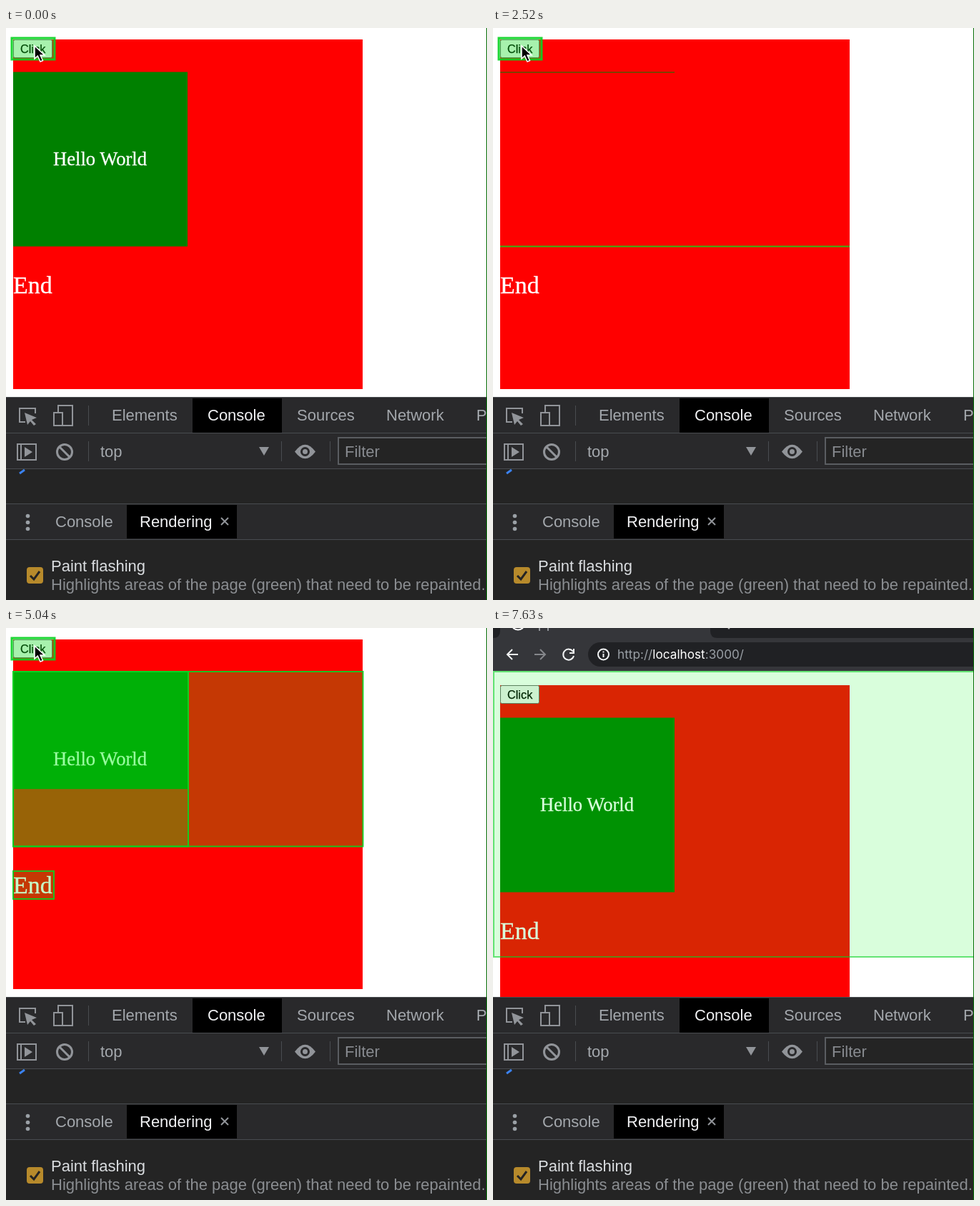
Write an HTML page that moves like this. It is 673 px wide and 800 px high and loops after 7.7 s.

```html
<!DOCTYPE html>
<html lang="en">
<head>
<meta charset="utf-8">
<title>Paint flashing</title>
<style>
  html, body { margin: 0; width: 100%; height: 100%; overflow: hidden; background: #fff; }
  svg { display: block; width: 673px; height: 800px; }
  text { white-space: pre; }
  .ui { font: 22px "Liberation Sans", Arial, sans-serif; fill: #a4a8ad; }
  .serif { font-family: "Liberation Serif", Times, serif; fill: #fff; stroke: #fff; stroke-width: .3; }
  .bright { fill: #f1f2f4; }
  .line { fill: none; stroke: #919499; stroke-width: 2; }
  .flash { fill: rgb(0,245,20); stroke: rgb(10,210,35); stroke-width: 2; }
</style>
</head>
<body>
<svg viewBox="0 0 673 800">
  <defs>
    <clipPath id="reveal"><rect id="revealRect" x="10" y="61.5" width="244" height="244"/></clipPath>
  </defs>
  <rect width="673" height="800" fill="#fff"/>

  <g id="page">
    <rect x="10" y="16" width="489" height="489" fill="#f00"/>
    <g clip-path="url(#reveal)">
      <rect x="10" y="61" width="244" height="245" fill="#008000"/>
      <text class="serif" x="66" y="192" font-size="26.6">Hello World</text>
    </g>
    <text id="end" class="serif" x="10" y="371" font-size="34">End</text>
    <rect id="edge" x="10" y="304.5" width="489" height="2" fill="#32b814"/>
    <rect x="10.5" y="16.5" width="54" height="25" rx="2" fill="#efefef" stroke="#6b6b6b"/>
    <text x="20" y="35" font-size="16.3" font-family="Liberation Sans, Arial, sans-serif" stroke="#000" stroke-width=".25">Click</text>
    <g id="flashes"></g>
  </g>

  <g id="toolbar">
    <rect width="673" height="60" fill="#35363a"/>
    <path d="M304 0V4Q304 14 314 14H673V0ZM0 0H10V4Q10 14 0 14Z" fill="#202124"/>
    <path d="M28 0Q35 5 42 0" fill="none" stroke="#fff" stroke-width="2"/>
    <path d="M65 0V4M77 0V4" class="line"/>
    <circle cx="330" r="1.5" fill="#bbb"/>
    <rect x="133" y="20" width="570" height="34" rx="17" fill="#202124"/>
    <g fill="none" stroke="#f1f3f4" stroke-width="2">
      <path d="M35 37H20M27 30L20 37L27 44"/>
      <path d="M58 37H73M66 30L73 37L66 44" stroke="#85878b"/>
      <path d="M112 33A7.5 7.5 0 1 0 113 39M113 29V35H107"/>
      <circle cx="154.500" cy="37" r="7.500"/>
      <path d="M154.500 36V41M154.500 32.500V34.500"/>
    </g>
    <text x="174" y="43" font-size="17.2" font-family="Inter, sans-serif" fill="#9aa0a6">http://<tspan fill="#fff">localhost</tspan>:3000/</text>
  </g>

  <circle id="ring" cx="39" cy="27" fill="none" stroke="#8796d8" stroke-width="4"/>

  <g id="devtools">
    <rect y="516" width="673" height="284" fill="#29292b"/>
    <path d="M0 617H673V665H0ZM0 716H673V800H0Z" fill="#242424"/>
    <path d="M0 516.500H673M0 566.500H673M0 616.500H673M0 665.500H673M0 715.500H673M115.500 528V556M115.500 578V606M385.500 578V606M453.500 578V606" stroke="#494c50"/>
    <path d="M261 518H386V566H261ZM169 667H323V714H169Z" fill="#000"/>

    <path class="line" d="M27 551H19V532H41V539"/>
    <path d="M26 538L43 545L36 548L42 554L39 556L34 550L30 555Z" fill="#919499"/>
    <path class="line" d="M73 537V528H93V556H80M67 538H79V556H67Z"/>
    <path class="line" d="M16 582H42V604H16ZM21 582V604"/>
    <path d="M26 586L37 593L26 600Z" fill="#919499"/>
    <g fill="none" stroke="#919499" stroke-width="3">
      <circle cx="82" cy="593" r="10.500"/>
      <path d="M74.500 585.500L89.500 600.500"/>
    </g>
    <path d="M354 586H368L361 598Z" fill="#919499"/>
    <path d="M404 592.500Q418.500 573 433 592.500Q418.500 612 404 592.500Z" fill="#919499"/>
    <circle cx="418.500" cy="592.500" r="5" fill="#919499" stroke="#29292b" stroke-width="3"/>
    <rect x="465" y="573" width="220" height="37" fill="#242424" stroke="#5a5d61" stroke-width="2"/>
    <path d="M19 623L26 618" stroke="#3b82f0" stroke-width="3"/>
    <g fill="#9aa0a6">
      <circle cx="30.500" cy="682.500" r="2.800"/><circle cx="30.500" cy="691.500" r="2.800"/><circle cx="30.500" cy="700.500" r="2.800"/>
    </g>
    <path class="line" d="M301 685L311 695M311 685L301 695"/>
    <rect x="29" y="754" width="23" height="23" rx="4" fill="#b78a2b"/>
    <path d="M34 766L39 771L47 760" fill="none" stroke="#242424" stroke-width="3"/>

    <g class="ui">
      <text x="148" y="549">Elements</text>
      <text x="282" y="549" class="bright">Console</text>
      <text x="407" y="549">Sources</text>
      <text x="532" y="549">Network</text>
      <text x="658" y="549">P</text>
      <text x="132" y="600">top</text>
      <text x="474" y="600" fill="#888b90">Filter</text>
      <text x="69" y="698">Console</text>
      <text x="187" y="698" class="bright">Rendering</text>
      <text x="63" y="759.500" fill="#dadde0">Paint flashing</text>
      <text x="63" y="786" fill="#8b8e92">Highlights areas of the page (green) that need to be repainted.</text>
    </g>
  </g>

  <path id="cursor" d="M0 0V18L4.300 14L8 22L11.500 20.500L8 13H14Z" fill="#000" stroke="#fff" stroke-width="1.500"/>
  <rect x="672" width="1" height="800" fill="#087008"/>
</svg>

<script>
const LOOP = 7700, STEP = 70, BOX = 244;
const CLOSE = 1955, CLOSED = 2590, OPEN = 4845, GROW = 630;
const el = id => document.getElementById(id);
const clamp = v => Math.min(1, Math.max(0, v));
const easeOut = v => 1 - (1 - clamp(v)) ** 3;
const set = (node, attrs) => { for (const k in attrs) node.setAttribute(k, attrs[k]); };

function addFlash(x, y, width, height) {
  const node = document.createElementNS("http://www.w3.org/2000/svg", "rect");
  set(node, { class: "flash", x, y, width, height });
  return el("flashes").appendChild(node);
}
const buttonFlash = addFlash(8, 14, 60, 30);
const boxFlash = addFlash(10, 61, 245, 244.5);
const rowFlash = addFlash(10, 61, 489.5, 244.5);
const endFlash = addFlash(10, 340, 57, 39);
const movedEndFlash = addFlash(10, 95.5, 57, 39);
const pageFlash = addFlash(1, -3, 680, 399);
buttonFlash.style.strokeWidth = 3;

function setFlash(node, alpha) {
  set(node, { "fill-opacity": alpha, "stroke-opacity": Math.min(.9, alpha * 4) });
}

// Full strength for `hold` ms after `start`, then a linear fade.
function pulse(t, start, hold, fade) {
  return t < start ? 0 : clamp(1 - (t - start - hold) / fade);
}

function boxHeight(t) {
  if (t < CLOSE) return BOX;
  if (t < CLOSED) return Math.max(1, BOX * (1 - easeOut((t - CLOSE) / GROW)));
  return t < OPEN ? 0 : BOX * easeOut((t - OPEN) / GROW);
}

function drawRing(t) {
  const age = [1885, 4775].map(start => t - start).find(a => a >= 0 && a < 210);
  set(el("ring"), age === undefined
    ? { opacity: 0 }
    : { r: 18 + age * .147, opacity: .85 * clamp((210 - age) / 130) });
}

function draw(t) {
  const collapsed = t >= CLOSED && t < OPEN;
  set(el("revealRect"), { height: boxHeight(t) });
  set(el("end"), { y: collapsed ? 126 : 371 });
  set(el("edge"), { opacity: t >= CLOSE && t < CLOSED ? 1 : 0 });

  const press = t >= 1885 && t < CLOSED ? 1 : 0;
  setFlash(buttonFlash, .3 * Math.max(press, pulse(t, 0, 70, 350),
    pulse(t, 4775, 500, 350), pulse(t, 6720, 70, 350)));

  const closing = collapsed ? .25 * pulse(t, CLOSED, 70, 350) : 0;
  const opening = .26 * pulse(t, OPEN, 150, 350);
  const residue = collapsed ? .045 : 0;
  const local = Math.max(closing, opening, residue);
  setFlash(boxFlash, local);
  setFlash(endFlash, local);
  setFlash(rowFlash, opening);
  setFlash(movedEndFlash, closing);
  setFlash(pageFlash, t >= 7560 ? .15 : 0);

  const slide = 64 * easeOut((t - 7350) / 280);
  set(el("page"), { transform: `translate(0 ${slide})` });
  set(el("toolbar"), { transform: `translate(0 ${slide - 64})` });

  const leave = clamp((t - 6580) / 140);
  set(el("cursor"), { transform: `translate(40 ${25 - 60 * leave ** 2})` });
  drawRing(t);
}

function tick() {
  draw(Math.floor(performance.now() % LOOP / STEP) * STEP);
  requestAnimationFrame(tick);
}
tick();
</script>
</body>
</html>
```
